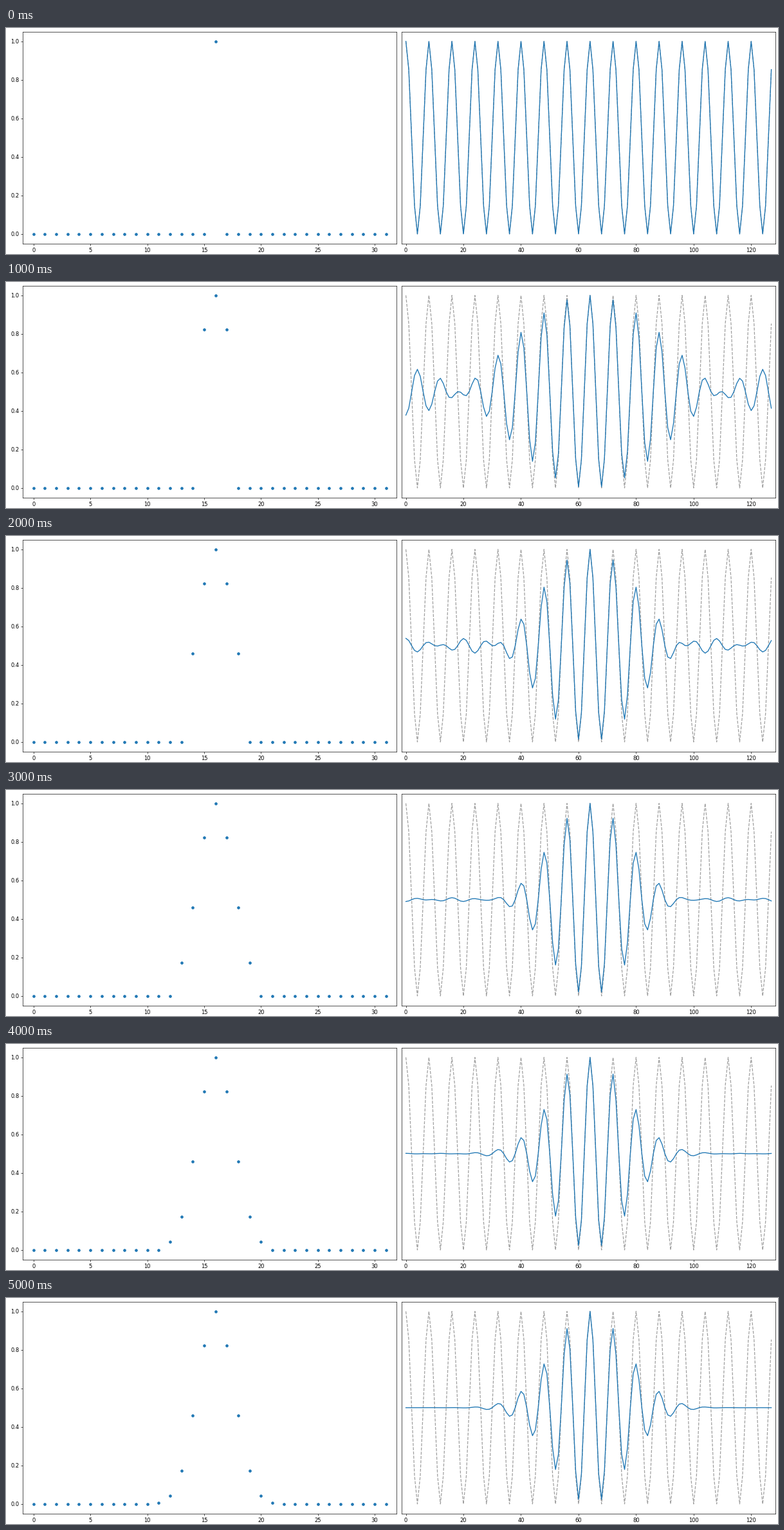
These frames come from a looping animation (1200 by 352 pixels, 6 s). A matplotlib script:

```python
import matplotlib.pyplot as plt
import numpy as np
from matplotlib.animation import FuncAnimation

W, H, DPI = 1200, 352, 60
BINS, SAMPLES, CENTER = 32, 128, 16
SIGMA = 1.6
FRAMES = 6

k = np.arange(BINS)
t = np.arange(SAMPLES)


def spectrum(reach):
    """Gaussian around the centre bin, cut off beyond `reach` bins."""
    offset = k - CENTER
    return np.where(np.abs(offset) <= reach, np.exp(-offset**2 / (2 * SIGMA**2)), 0)


def packet(weights):
    """Weighted sum of cosines in phase at mid-range, scaled to 0..1."""
    waves = np.cos(2 * np.pi * np.outer(k, t - SAMPLES / 2) / SAMPLES)
    return 0.5 + 0.5 * weights @ waves / weights.sum()


def add_axes(left, right, top=5.8, bottom=335.8):
    ax = fig.add_axes([left / W, 1 - bottom / H, (right - left) / W, (bottom - top) / H])
    ax.set_ylim(-0.05, 1.05)
    ax.tick_params(labelsize=10)
    return ax


plt.rcParams["font.family"] = "DejaVu Sans"
fig = plt.figure(figsize=(W / DPI, H / DPI), dpi=DPI, facecolor="white")

ax_freq = add_axes(26.2, 607.2)
ax_freq.set_xlim(-0.94, 31.94)
ax_time = add_axes(615.1, 1196.1)
ax_time.set_xlim(-1.45, 128.45)
ax_time.set_yticks([])

dots = ax_freq.scatter(k, spectrum(0), s=20, color="C0")
ax_time.plot(t, packet(spectrum(0)), "--", color="#a0a0a0", lw=1.5)
line, = ax_time.plot(t, packet(spectrum(0)), color="C0", lw=1.6)


def update(frame):
    weights = spectrum(frame)
    dots.set_offsets(np.column_stack([k, weights]))
    line.set_ydata(packet(weights))
    return dots, line


anim = FuncAnimation(fig, update, frames=FRAMES, interval=1000, repeat=True, repeat_delay=0)
plt.show()
```
